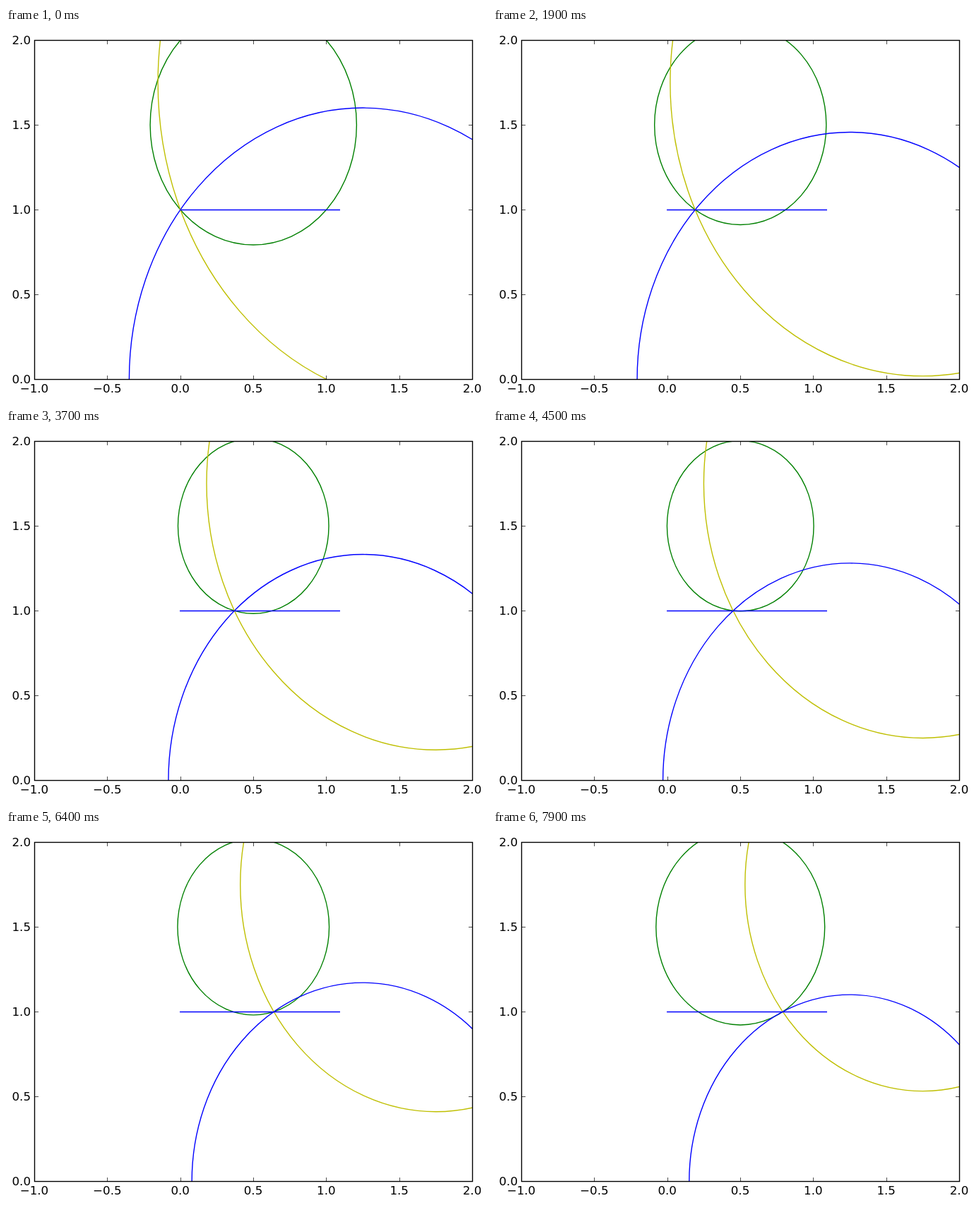
These frames come from a looping animation (681x528 px, 8 s). An HTML page:

```html
<!DOCTYPE html>
<html>
<head>
<meta charset="utf-8">
<style>
html, body { margin: 0; width: 100%; height: 100%; overflow: hidden; background: #fff; }
svg { display: block; }
text { font: 16.67px "DejaVu Sans", sans-serif; }
</style>
</head>
<body>
<svg id="plot" width="681" height="528" viewBox="0 0 681 528">
  <clipPath id="area"><rect x="40" y="17" width="621" height="481"/></clipPath>
</svg>
<script>
const svg = document.getElementById('plot');
const STEP = 100, STEPS = 80;
const SX = 620 / 3, SY = 240;
const px = x => 40.25 + (x + 1) * SX;
const py = y => 497.25 - y * SY;

function add(parent, tag, attrs, text) {
  const el = document.createElementNS('http://www.w3.org/2000/svg', tag);
  for (const key in attrs) el.setAttribute(key, attrs[key]);
  if (text) el.textContent = text;
  parent.appendChild(el);
  return el;
}

const curves = add(svg, 'g', { 'clip-path': 'url(#area)', fill: 'none', 'stroke-width': 1.39 });
const circles = [
  { x: 0.5, y: 1.5, color: '#008000' },
  { x: 1.25, y: 0, color: '#0000ff' },
  { x: 1.75, y: 1.75, color: '#bfbf00' }
];
for (const c of circles) {
  c.el = add(curves, 'ellipse', { cx: px(c.x), cy: py(c.y), stroke: c.color });
}
add(curves, 'path', { d: 'M246 257.5H473', stroke: '#0000ff' });

// Frame, inward ticks and labels
add(svg, 'rect', { x: 40.5, y: 17.5, width: 620, height: 480, fill: 'none', stroke: '#000', 'stroke-width': 1.39 });
const tick = d => add(svg, 'path', { d, stroke: '#000', 'stroke-width': 0.7 });
const label = value => value.toFixed(1).replace('-', '\u2212');

for (let v = -1; v <= 2; v += 0.5) {
  const x = Math.round(40 + (v + 1) * SX) + 0.5;
  tick(`M${x} 497.5v-5.56M${x} 17.5v5.56`);
  add(svg, 'text', { x: 40 + (v + 1) * SX, y: 516, 'text-anchor': 'middle' }, label(v));
}
for (let v = 0; v <= 2; v += 0.5) {
  const y = 497.5 - v * SY;
  tick(`M40.5 ${y}h5.56M660.5 ${y}h-5.56`);
  add(svg, 'text', { x: 35, y: y + 5.5, 'text-anchor': 'end' }, label(v));
}

// Every circle passes through a point sliding along y = 1.
function draw(time) {
  const x = Math.floor(time / STEP) % STEPS / 100;
  for (const c of circles) {
    const r = Math.hypot(c.x - x, c.y - 1);
    c.el.setAttribute('rx', r * SX);
    c.el.setAttribute('ry', r * SY);
  }
}

const start = performance.now();
function loop() {
  draw(performance.now() - start);
  requestAnimationFrame(loop);
}
loop();
</script>
</body>
</html>
```
